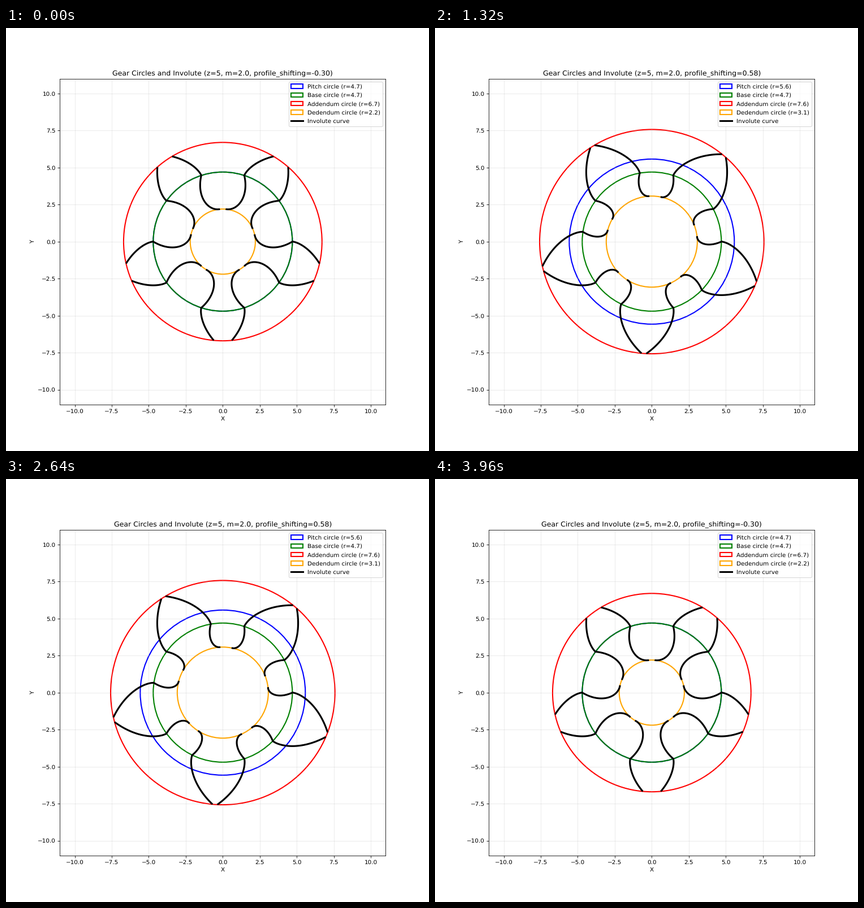
Write a matplotlib script that moves like this. It is 748 px wide and 748 px high and loops after 4000 ms.

```python
import numpy as np
import matplotlib.pyplot as plt
from matplotlib.animation import FuncAnimation

plt.rcParams["text.hinting"] = "none"

TEETH = 5
MODULE = 2.0
PRESSURE = np.radians(20)
PITCH = TEETH * MODULE / 2
BASE = PITCH * np.cos(PRESSURE)
STEP = 2 * np.pi / TEETH

# Profile shift sweeps up, then back down
SWEEP = np.linspace(-0.3, 1.0, 50)
SHIFTS = np.concatenate([SWEEP, SWEEP[::-1]])

CIRCLES = [("Pitch", "blue"), ("Base", "green"),
           ("Addendum", "red"), ("Dedendum", "orange")]


def radii(shift):
    pitch = PITCH + shift
    return pitch, BASE, pitch + MODULE, pitch - 1.25 * MODULE


def involute(outer, n=60):
    """Polar involute from the base circle out to the outer radius."""
    t = np.linspace(0, np.sqrt((outer / BASE) ** 2 - 1), n)
    return BASE * np.hypot(1, t), np.arctan(t) - t


def trochoid(root, n=60):
    """Polar root curve from the root circle, ending at angle 0 on the base circle."""
    t = np.linspace(0, np.sqrt(BASE ** 2 - root ** 2) / BASE, n)
    angle = t - np.arctan(BASE * t / root)
    return np.hypot(root, BASE * t), angle - angle[-1]


def tooth_angle(pitch):
    """Angle of one tooth measured on the base circle."""
    alpha = np.arccos(min(1, BASE / pitch))
    return STEP / 2 + 2 * (np.tan(alpha) - alpha)


def both_sides(curve, width):
    """Copies of one polar curve on the two sides of every tooth."""
    r, a = curve
    for k in range(TEETH):
        for angle in (k * STEP + a, k * STEP - width - a):
            yield r * np.cos(angle), r * np.sin(angle)


def black_lines(cap):
    return [ax.plot([], [], color="black", lw=3, solid_capstyle=cap)[0]
            for _ in range(2 * TEETH)]


fig, ax = plt.subplots(figsize=(10, 10), dpi=74.8)
ax.set_aspect("equal")
ax.set_xlim(-11, 11)
ax.set_ylim(-11, 11)
ax.set_xlabel("X")
ax.set_ylabel("Y")
ax.grid(True, alpha=0.3)

rings = [ax.add_patch(plt.Circle((0, 0), 1, fill=False, color=color, lw=2, label=name))
         for name, color in CIRCLES]
roots = black_lines("projecting")
flanks = black_lines("butt")
roots[0].set_label("Involute curve")
legend = ax.legend(loc="upper right", labelspacing=0.54)
title = ax.set_title("")


def draw(i):
    shift = SHIFTS[i]
    pitch, _, outer, root = sizes = radii(shift)
    for ring, r, text, (name, _) in zip(rings, sizes, legend.get_texts(), CIRCLES):
        ring.set_radius(r)
        text.set_text(f"{name} circle (r={r:.1f})")
    width = tooth_angle(pitch)
    for lines, curve in ((roots, trochoid(root)), (flanks, involute(outer))):
        for line, xy in zip(lines, both_sides(curve, width)):
            line.set_data(*xy)
    title.set_text(f"Gear Circles and Involute (z={TEETH}, m={MODULE}, "
                   f"profile_shifting={shift:.2f})")
    return [*rings, *roots, *flanks, legend, title]


anim = FuncAnimation(fig, draw, frames=len(SHIFTS), interval=40,
                     repeat=True, repeat_delay=0)
plt.show()
```
